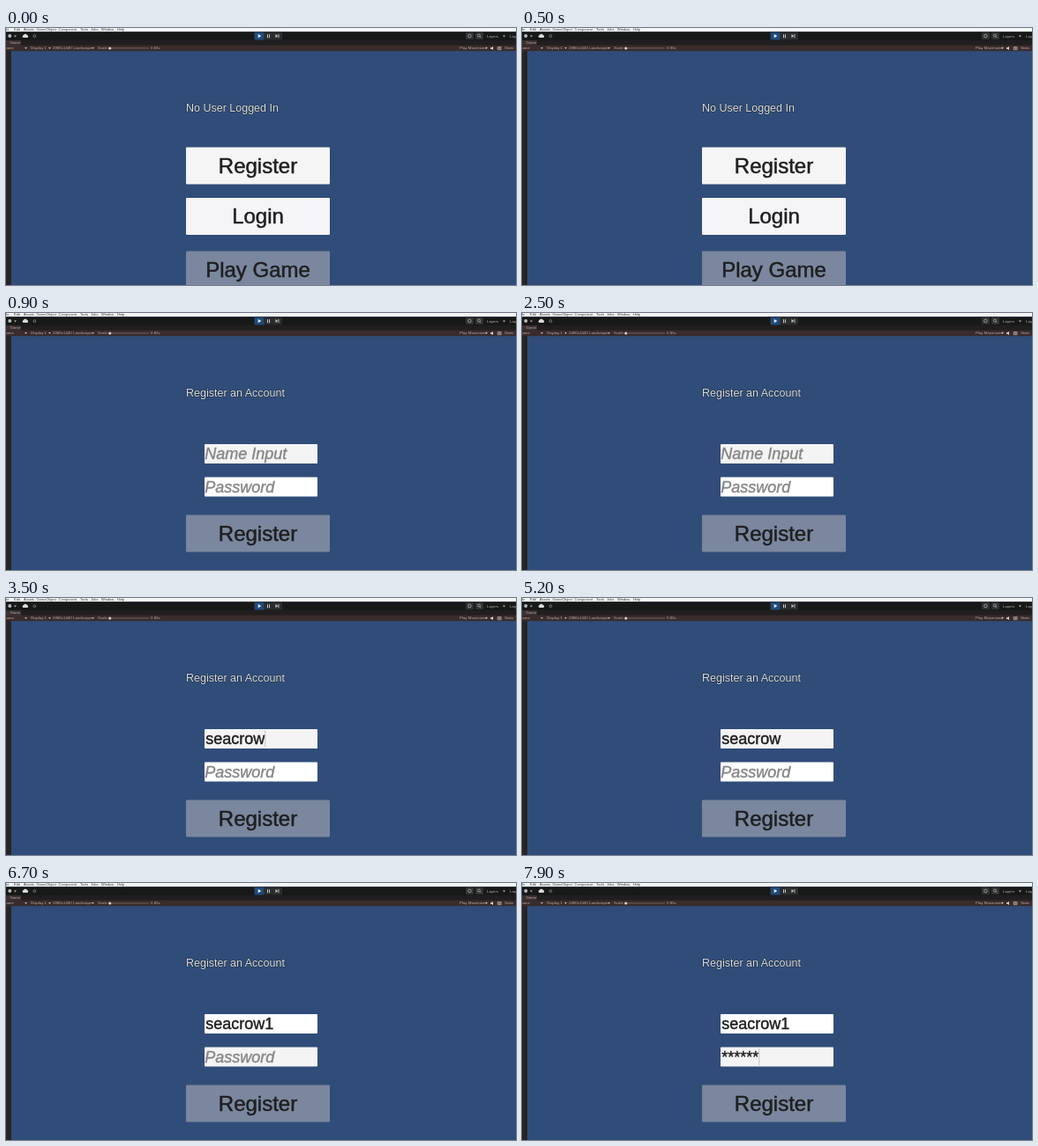
Animation, 578 px wide and 292 px high, one loop 8 s. Source, as an HTML page:

```html
<!DOCTYPE html>
<html lang="en">
<head>
<meta charset="utf-8">
<title>Register an account</title>
<style>
  html, body { margin: 0; width: 100%; height: 100%; overflow: hidden; background: #304d79; }
  svg { display: block; width: 100vw; height: 100vh; }
  text { font-family: "Liberation Sans", Arial, sans-serif; white-space: pre; }
  .title { font-size: 12.5px; fill: #dcdcd8; stroke: #1c2b44; stroke-width: .9px; paint-order: stroke; }
  .label { font-size: 24px; fill: #1f1f21; stroke: #1f1f21; stroke-width: .5px; text-anchor: middle; }
  .typed { font-size: 18px; fill: #1c1c1e; stroke: #1c1c1e; stroke-width: .4px; }
  .hint { font-size: 18px; font-style: italic; fill: #868686; stroke: #868686; stroke-width: .4px; }
  .menu { font-size: 4px; fill: #333; }
  .tool { font-size: 4.4px; fill: #b5aaa8; }
</style>
</head>
<body>
<svg id="stage" viewBox="0 0 578 292" preserveAspectRatio="none"></svg>
<script>
const LOOP = 8000;
const stage = document.getElementById('stage');

function add(parent, tag, attrs, text) {
  const el = document.createElementNS('http://www.w3.org/2000/svg', tag);
  for (const key in attrs) el.setAttribute(key, attrs[key]);
  if (text !== undefined) el.textContent = text;
  parent.appendChild(el);
  return el;
}
const group = () => add(stage, 'g', {});
const rect = (p, x, y, width, height, fill, rx = 0) => add(p, 'rect', { x, y, width, height, fill, rx });
const path = (p, d, fill, stroke = 'none') => add(p, 'path', { d, fill, stroke, 'stroke-width': .7 });
const write = (p, cls, x, y, text) => add(p, 'text', { class: cls, x, y }, text);
const grey = v => `rgb(${v},${v},${v})`;
const show = (el, on) => el.setAttribute('visibility', on ? 'visible' : 'hidden');

function button(p, y, text, fill) {
  const box = rect(p, 204, y, 163, 42, fill, 1);
  write(p, 'label', 285.5, y + 29.3, text);
  return box;
}

function field(p, y, hint) {
  const box = rect(p, 225, y, 128, 22, '#fff', .8);
  const placeholder = write(p, 'hint', 225.3, y + 17.3, hint);
  const typed = write(p, 'typed', 226.2, y + 17.3, '');
  const caret = rect(p, 226, y + 1.2, .8, 19.5, '#b9b9bd');
  return { box, placeholder, typed, caret, y };
}

function setField(f, text, caretOn, shade) {
  f.box.setAttribute('fill', grey(shade));
  show(f.placeholder, !text);
  if (f.typed.textContent !== text) f.typed.textContent = text;
  const end = text ? 226.4 + f.typed.getComputedTextLength() : 226;
  f.caret.setAttribute('x', end);
  // An empty field only shows a trace of the caret beside its hint.
  f.caret.setAttribute('y', f.y + (text ? 1.2 : 11));
  f.caret.setAttribute('height', text ? 19.5 : 5);
  show(f.caret, caretOn);
}

function drawEditor() {
  const g = group();
  rect(g, 0, 0, 578, 292, '#304d79');
  rect(g, 0, 26, 6, 266, '#292425');
  rect(g, 0, 0, 578, 4.3, '#f6f8f7');
  rect(g, 0, 4.3, 578, 9.7, '#171918');
  rect(g, 0, 14, 578, 6, '#211e1f');
  rect(g, 0, 14, 17, 6, '#3b3031');
  rect(g, 0, 19.6, 578, 6.6, '#3a2b2c');

  [[-3, 'File'], [9, 'Edit'], [20, 'Assets'], [34.5, 'GameObject'], [59.5, 'Component'],
   [84, 'Tools'], [96, 'Jobs'], [108, 'Window'], [126, 'Help']]
    .forEach(([x, s]) => write(g, 'menu', x, 3, s));
  [[4.5, 18.4, 'Game'], [-3, 24.4, 'Game'], [28, 24.4, 'Display 1'], [53, 24.4, '2880x1440 Landscape'],
   [104, 24.4, 'Scale'], [164, 24.4, '0.83x'], [514, 24.4, 'Play Maximized'],
   [565, 24.4, 'Stats'], [545, 10.7, 'Layers'], [571, 10.7, 'Layout']]
    .forEach(([x, y, s]) => write(g, 'tool', x, y, s));
  [[21, 22], [48, 22], [97, 22], [543, 22], [563, 8.4], [9, 8.4]]
    .forEach(([x, y]) => path(g, `M${x} ${y}h3l-1.5 2z`, '#bdb3b0'));

  // Scale slider
  rect(g, 118, 22.6, 44, .7, '#86797a');
  add(g, 'circle', { cx: 117.7, cy: 23, r: 1.6, fill: '#d8d0ce' });

  // Playback controls
  rect(g, 281, 4.8, 32, 8.6, '#2a2c2d', 1);
  rect(g, 282, 4.8, 10.3, 8.6, '#1f4a7c', 1);
  path(g, 'M285.7 6.9l3.7 2.2-3.7 2.2z', '#dfe9f5');
  path(g, 'M296 7.2h1v4h-1zM298 7.2h1v4h-1z', '#c8c8c8');
  path(g, 'M305.5 7l2.6 2.1-2.6 2.1zM308.5 7h.9v4.2h-.9z', '#c8c8c8');

  // Account, cloud, settings, history and search
  add(g, 'circle', { cx: 4.3, cy: 9, r: 2, fill: '#b8bab9' });
  path(g, 'M19.5 11a1.6 1.6 0 0 1 .4-3 2.2 2.2 0 0 1 4 0 1.6 1.6 0 0 1 .4 3z', '#d8dad9');
  add(g, 'circle', { cx: 32.4, cy: 9.2, r: 1.4, fill: 'none', stroke: '#8d908f', 'stroke-width': .8 });
  rect(g, 521, 5, 9, 8, '#303233', 1);
  add(g, 'circle', { cx: 525.4, cy: 9, r: 1.8, fill: 'none', stroke: '#b8b8b8', 'stroke-width': .7 });
  rect(g, 532, 5, 9, 8, '#303233', 1);
  add(g, 'circle', { cx: 536, cy: 8.6, r: 1.5, fill: 'none', stroke: '#b8b8b8', 'stroke-width': .7 });
  path(g, 'M537 9.7l1.5 1.5', 'none', '#b8b8b8');
  path(g, 'M549 22.3h1.3l1.7-1.4v4.2l-1.7-1.4H549z', '#e2dcda');
  path(g, 'M557.2 21.5h4v3.2h-4zM557.2 23.1h4M559.2 21.5v3.2', 'none', '#b8aeac');
}

drawEditor();

const home = group();
write(home, 'title', 204, 95.2, 'No User Logged In');
const registerBox = button(home, 135.5, 'Register', '#f5f5f5');
button(home, 193, 'Login', '#f5f4f6');
button(home, 253.4, 'Play Game', '#7a879e');

const form = group();
write(form, 'title', 204, 95.2, 'Register an Account');
const nameField = field(form, 149, 'Name Input');
const passField = field(form, 186.6, 'Password');
button(form, 229.6, 'Register', '#7a879e');

const NAME = 'seacrow1';
const nameKeys = [2800, 2900, 3000, 3200, 3300, 3400, 3500, 6200];
const passKeys = [7400, 7500, 7600, 7700, 7900, 7900];
const count = (keys, t) => keys.filter(k => t >= k).length;
const ramp = (t, from, to, a, b) => Math.round(a + (b - a) * Math.min(1, Math.max(0, (t - from) / (to - from))));
const within = (t, spans) => spans.some(([a, b]) => t >= a && t < b);

function draw(t) {
  const onForm = t >= 900;
  show(home, !onForm);
  show(form, onForm);
  registerBox.setAttribute('fill', grey(ramp(t, 650, 750, 245, 198)));
  // Fields live in a hidden group, so their own visibility is only set while the form is up.
  if (!onForm) {
    for (const f of [nameField, passField]) {
      show(f.placeholder, false);
      show(f.caret, false);
      f.typed.textContent = '';
    }
    return;
  }
  const nameCaret = within(t, [[1900, 2500], [2800, 4100], [4600, 5200], [5800, 6500]]);
  const passCaret = within(t, [[6500, 7100], [7400, LOOP]]);
  setField(nameField, NAME.slice(0, count(nameKeys, t)), nameCaret, ramp(t, 6500, 6700, 244, 255));
  setField(passField, '*'.repeat(count(passKeys, t)), passCaret, ramp(t, 6500, 6700, 255, 244));
}

const start = performance.now();
function tick() {
  draw((performance.now() - start) % LOOP);
  requestAnimationFrame(tick);
}
tick();
</script>
</body>
</html>
```
